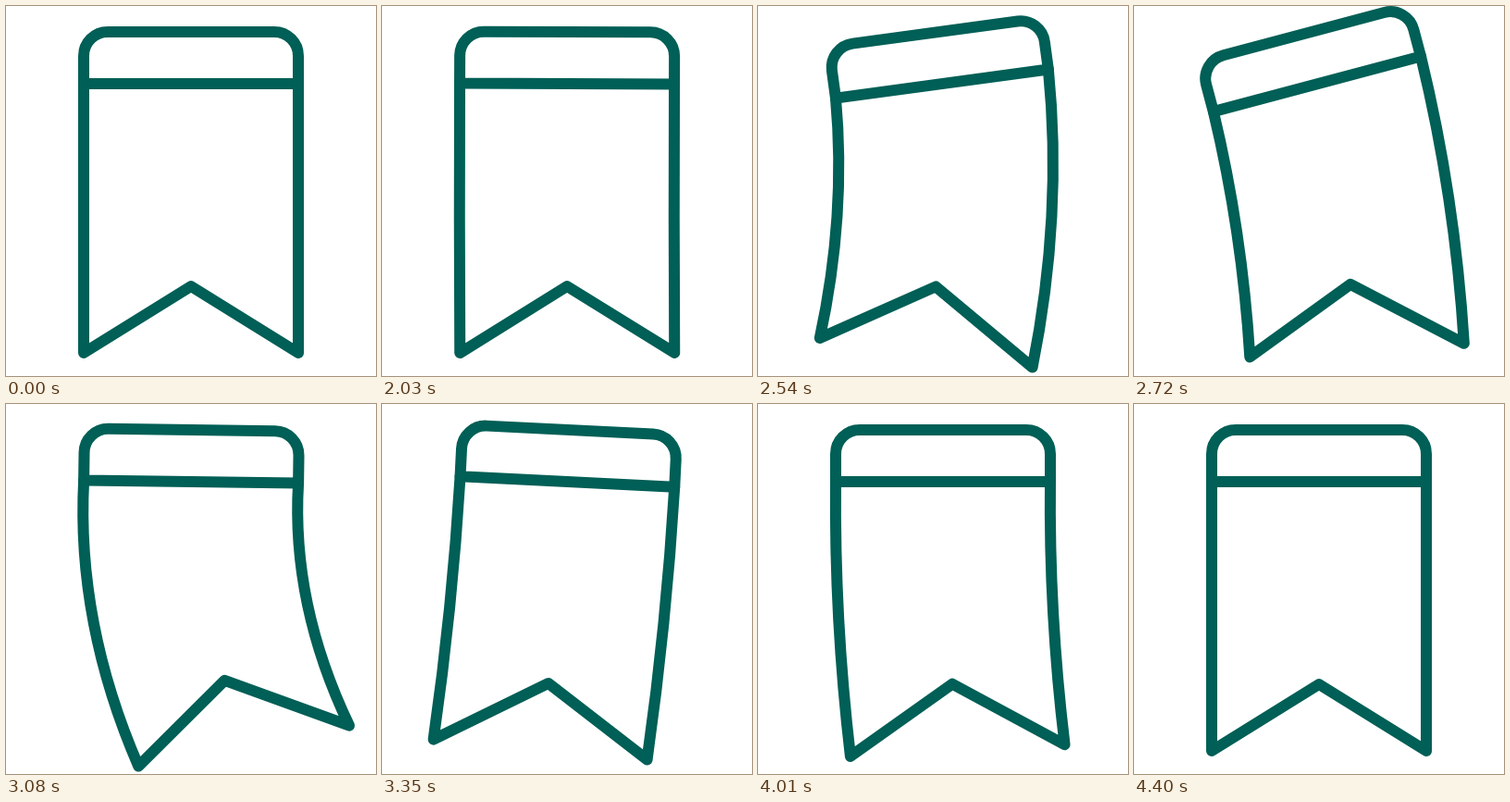
These frames come from a looping animation (400 px wide and 400 px high, 4430 ms). An HTML page:

```html
<!DOCTYPE html>
<html>
<head>
<meta charset="utf-8">
<title>Waving bookmark</title>
<style>
  html, body { margin: 0; width: 100%; height: 100%; overflow: hidden; background: #fff; }
  svg { display: block; width: 100%; height: 100%; }
  path { fill: none; stroke: #005f56; stroke-width: 12; stroke-linecap: round; stroke-linejoin: round; }
</style>
</head>
<body>
<svg viewBox="0 0 400 400">
  <g id="flag">
    <path d="M-116 0V-30A26 26 0 0 1 -90 -56H90A26 26 0 0 1 116 -30V0Z"/>
    <path id="cloth"/>
  </g>
</svg>
<script>
const LOOP = 4430, START = 2030, STEP = 30;
const HALF = 116, LENGTH = 291, NOTCH = 72;
const flag = document.getElementById('flag');
const cloth = document.getElementById('cloth');

// Turning points as [time, value]: header angle in degrees, tail drift in pixels
const swing = [[2000, 0], [2250, 5], [2740, -15], [3200, 4], [3620, 0]];
const drift = [[2000, 0], [2130, 9], [2570, -57], [3080, 61], [3480, -40], [3980, 16], [4400, 0]];

function ease(keys, t) {
  let i = 0;
  while (i < keys.length - 2 && t > keys[i + 1][0]) i++;
  const [t0, a] = keys[i], [t1, b] = keys[i + 1];
  const u = Math.min(1, Math.max(0, (t - t0) / (t1 - t0)));
  return a + (b - a) * u * u * (3 - 2 * u);
}

function draw(t) {
  const angle = ease(swing, t), x = ease(drift, t);

  // The tail tilts with its drift, more so while the header leans left
  const tilt = -x * (0.2 - 0.01 * angle) * Math.PI / 180;
  const dx = HALF * Math.cos(tilt), dy = HALF * Math.sin(tilt);
  const y = LENGTH - x * x / 600;
  const lean = -0.1 * Math.abs(x);
  const notch = [x * 0.645, y - NOTCH * Math.cos(tilt)];

  flag.setAttribute('transform', `translate(200 92) rotate(${angle}) translate(0 -8)`);
  cloth.setAttribute('d',
    `M${-HALF} 0Q${-HALF + lean} ${(y - dy) / 2} ${x - dx} ${y - dy}L${notch}` +
    `L${x + dx} ${y + dy}Q${HALF + lean} ${(y + dy) / 2} ${HALF} 0`);
}

function tick() {
  const t = performance.now() % LOOP;
  draw(t < START ? 0 : START + Math.floor((t - START) / STEP) * STEP);
  requestAnimationFrame(tick);
}
tick();
</script>
</body>
</html>
```
